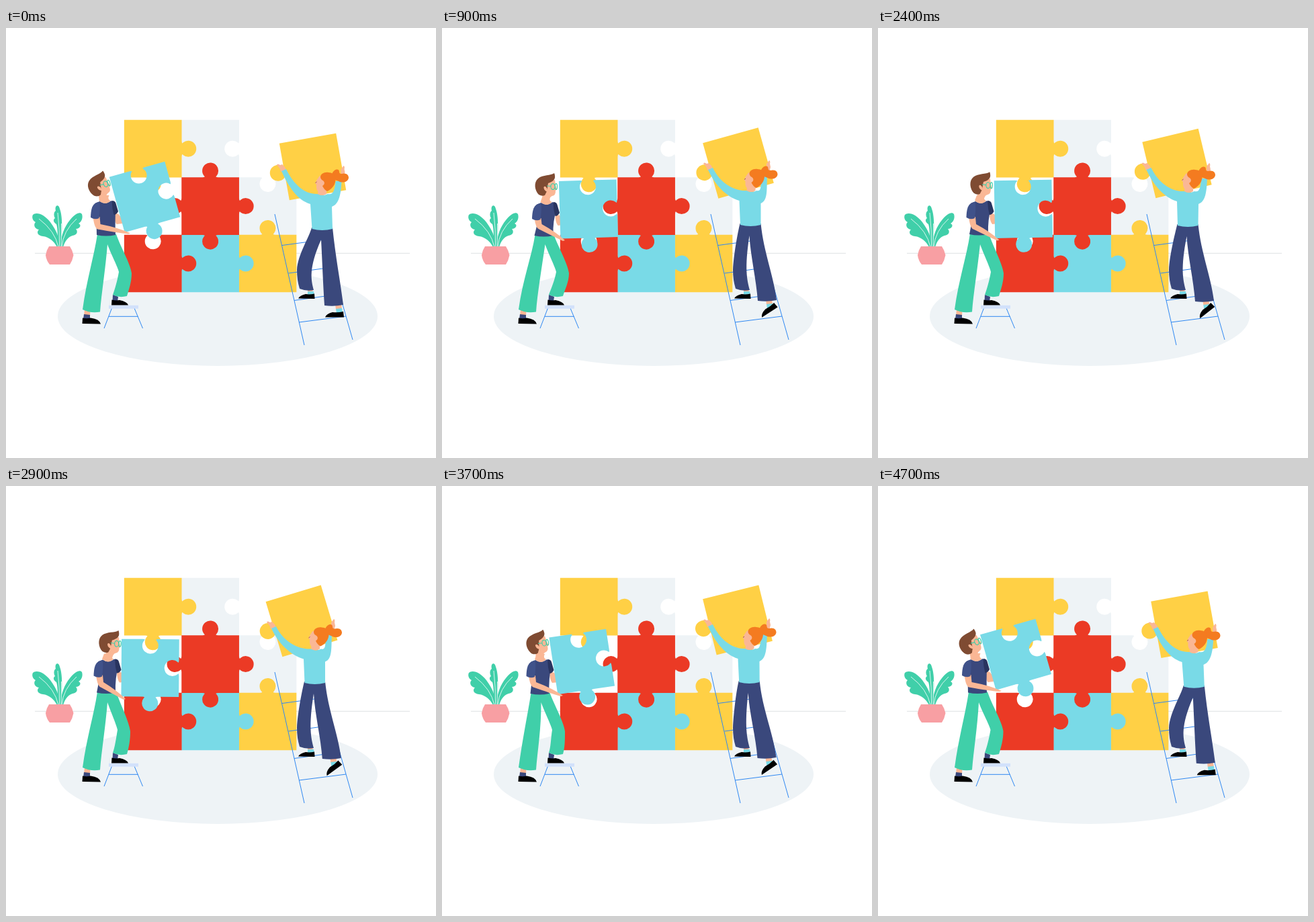
These frames come from a looping animation (640x640 px, 4.8 s). An HTML page with a canvas:

```html
<!DOCTYPE html>
<html lang="en">
<head>
<meta charset="utf-8">
<title>Puzzle team</title>
<style>
html, body { margin: 0; width: 100%; height: 100%; overflow: hidden; background: #fff; }
canvas { display: block; width: 100%; height: 100%; }
</style>
</head>
<body>
<canvas id="stage" width="640" height="640"></canvas>
<script>
const ctx = document.getElementById('stage').getContext('2d');
const LOOP = 4800, STEP = 100, CELL = 85.4;
const yellow = '#ffd045', red = '#eb3a25', aqua = '#79dae7', mist = '#eef3f6',
  green = '#40cfa9', navy = '#3a487c', skin = '#fab795', orange = '#f47b20',
  brown = '#7f4b32', pink = '#f89fa3', line = '#2f88f2';

// Pose tracks, one value per key time
const keys = [0, 900, 1600, 2400, 2900, 3700, 4700];
const manTracks = {
  px: [206.5, 218, 216.6, 216.3, 214.6, 208.2, 205],
  py: [251.5, 269.5, 267.5, 269.3, 270.8, 261.5, 250.7],
  pr: [-15.5, -1.7, -4, -1, .4, -8.7, -16],
  nx: [146.5, 154.5, 153.5, 152, 151, 146, 145.5],
  ny: [259, 261, 261, 259, 259.5, 260, 259],
  headX: [146, 156, 153.5, 154.5, 155, 147, 145],
  headR: [-18, 0, -5, 1, 2, -11, -19],
  hipX: [149, 151.5, 152, 150, 149, 145.5, 148],
  hipY: [309, 310, 311, 308, 308.5, 310, 308.5],
  knee: [187, 189, 189.5, 187, 185, 183, 186.5],
  handX: [185, 183, 183, 180.5, 178, 180, 184],
  handY: [305.5, 316, 315.5, 315.5, 317, 312, 305]
};
const womanTracks = {
  px: [456.5, 441, 443.5, 445, 440, 440, 456],
  py: [206.5, 201, 200, 201.5, 200.8, 199.5, 206.3],
  pr: [-10.1, -15.7, -10.1, -13.5, -16.8, -13.9, -10.2],
  nx: [471, 460.5, 458, 463, 461, 458.5, 470.5],
  ny: [248, 243, 243, 244, 243.5, 243, 248],
  hipX: [470.5, 459, 458, 461, 459.5, 457.2, 470.3],
  hipY: [299, 293, 292.5, 294, 293, 292, 298.8],
  legX: [488, 484, 484, 486, 484.8, 483.5, 487.8],
  legY: [413, 406, 405, 407, 406, 405, 412.8],
  foot: [0, -33, -36, -38, -36, -34, 0],
  leftX: [414, 400, 402, 403.5, 399, 400, 413.7],
  leftY: [211, 209, 205.5, 209, 210, 207, 211],
  rightX: [501.5, 486, 489, 492, 487, 486, 501.2],
  rightY: [211, 203, 205, 207, 204, 203, 211]
};

// Periodic cubic interpolation without overshoot
function sample(v, t) {
  const n = keys.length, time = k => keys[(k + n) % n] + LOOP * Math.floor(k / n);
  const val = k => v[(k + n) % n];
  const slope = k => (val(k + 1) - val(k)) / (time(k + 1) - time(k));
  const tangent = k => {
    const a = slope(k - 1), b = slope(k);
    return a * b > 0 ? 2 * a * b / (a + b) : 0;
  };
  let i = 0;
  while (i < n - 1 && keys[i + 1] <= t) i++;
  const d = time(i + 1) - time(i), u = (t - time(i)) / d, w = 1 - u;
  return (1 + 2 * u) * w * w * val(i) + u * w * w * d * tangent(i)
    + u * u * (3 - 2 * u) * val(i + 1) - u * u * w * d * tangent(i + 1);
}
function pose(tracks, t) {
  const p = {};
  for (const k in tracks) p[k] = sample(tracks[k], t);
  return p;
}

const at = (x, y) => (dx, dy) => `${x + dx} ${y + dy} `;
function fill(color, d) {
  ctx.fillStyle = color;
  ctx.fill(new Path2D(d));
}
function stroke(color, width, d) {
  ctx.strokeStyle = color;
  ctx.lineWidth = width;
  ctx.stroke(new Path2D(d));
}
function placed(x, y, deg, draw) {
  ctx.save();
  ctx.translate(x, y);
  ctx.rotate(deg * Math.PI / 180);
  draw();
  ctx.restore();
}

// sides: top, right, bottom, left; 1 tab, -1 notch, 0 flat
function piece(x, y, deg, color, sides) {
  const h = 42.85, r = 12, off = 9.7, a = Math.asin((off - 2) / r);
  placed(x, y, deg, () => {
    ctx.beginPath();
    ctx.moveTo(-h, -h);
    for (const s of sides) {
      if (s) {
        ctx.lineTo(-11.5, -h);
        ctx.quadraticCurveTo(-6.5, -h - .3 * s, -9.2, -h - 2 * s);
        ctx.arc(0, -h - off * s, r, s * (Math.PI - a), s * a, s < 0);
        ctx.quadraticCurveTo(6.5, -h - .3 * s, 11.5, -h);
      }
      ctx.lineTo(h, -h);
      ctx.rotate(Math.PI / 2);
    }
    ctx.closePath();
    ctx.fillStyle = color;
    ctx.fill();
  });
}
function wallPiece(col, row, color, sides) {
  piece(176 + CELL * (col + .5), 137 + CELL * (row + .5), 0, color, sides);
}

function room() {
  ctx.fillStyle = '#fff';
  ctx.fillRect(0, 0, 640, 640);
  stroke('#dfe2e4', 1, 'M43 335.3H601');
  ctx.fillStyle = mist;
  ctx.beginPath();
  ctx.ellipse(315, 429, 238, 74, 0, 0, 7);
  ctx.fill();
}
function plant() {
  fill(green, 'M79 326C79 310 76 303 66 289C57 277 45 273 40 278C38 282 40 287 44 289C40 293 43 299 49 300C45 304 47 309 55 310C64 311 71 317 76 326Z');
  fill(green, 'M81 326C82 308 87 296 95 286C103 276 110 273 113 277C115 283 112 289 108 291C113 293 110 299 104 299C108 304 105 308 99 309C92 311 88 317 85 326Z');
  fill(green, 'M77 326C77 308 77 298 75 292C70 289 70 285 73 283C70 278 72 273 74 272C72 264 78 261 80 269C84 280 84 297 82 326Z');
  stroke('#fff', .8, 'M49 284Q73 302 78 326M77 275Q80 300 79.6 326M105 284Q85 302 83 326M82.5 291L82 326');
  fill(pink, 'M64 325H95Q99 331 100.5 338Q99 346 95 352H65Q60 346 59 338Q60 331 64 325Z');
}
function wall() {
  wallPiece(1, 0, mist, [0, -1, 0, 0]);
  wallPiece(2, 1, mist, [-1, 0, 0, 0]);
  wallPiece(2, 2, yellow, [1, 0, 0, 0]);
  wallPiece(1, 2, aqua, [0, 1, 0, 0]);
  wallPiece(0, 2, red, [-1, 1, 0, 0]);
  wallPiece(0, 0, yellow, [0, 1, 1, 0]);
  wallPiece(1, 1, red, [1, 1, 1, 1]);
}
function furniture() {
  stroke(line, 1, 'M157.5 417L146 447M191 417L203.5 447M153 429.3H196.5');
  fill('#d2e1fb', 'M153 412.7H197V417.7H153Z');
  stroke(line, 1, 'M400 277L444 472M469 299L516 464M411 323.5L474 315M420.5 365L486 356M429 405.5L497 396M436 438L506 429');
}

function manHead() {
  fill(skin, 'M-1 -28L12 -30L13 -22L15 -16L13 -14Q13.5 -7 8 -6Q4 -5 3 2L-8 2L-5 -14Z');
  fill(brown, 'M11 -40C6 -36 -6 -38 -13 -32C-20 -26 -18 -14 -12 -8Q-7 -5 -3 -7L0 -13L2 -25C8 -27 13 -30 12 -36Q12 -38 11 -40Z');
  fill(skin, 'M1 -15C-1 -22 -5 -21 -4.5 -18Q-4 -14 1 -12Z');
  ctx.strokeStyle = green;
  ctx.lineWidth = 1.2;
  ctx.beginPath();
  ctx.ellipse(9, -20, 3.1, 4.4, 0, 0, 7);
  ctx.moveTo(15.5, -20);
  ctx.ellipse(13.9, -20, 1.6, 4.4, 0, 0, 7);
  ctx.moveTo(0, -21);
  ctx.lineTo(6, -20.5);
  ctx.stroke();
}
function man(p) {
  const n = at(p.nx, p.ny), h = at(p.hipX, p.hipY), hand = at(p.handX, p.handY);
  const k = p.knee, ex = p.nx - 6, ey = 292, elbow = at(ex, ey);
  const mid = at(ex + .6 * (p.handX - ex), ey + .6 * (p.handY - ey));

  fill(skin, `M${n(14, 16)}L${n(21, 18)}Q${n(27, 25)}${n(27, 32)}L${n(18, 33)}Q${n(14, 28)}${n(14, 16)}Z`);
  piece(p.px, p.py, p.pr, aqua, [-1, -1, 1, 0]);

  fill(skin, 'M117 419H125.5L125 428H116Z');
  fill(navy, 'M116 426L125 427V434H115ZM159 397L167 400L166 407H158.5Z');
  fill('#000', 'M114 431.5Q120 433 126 431.5Q139 433 141 440.5L113.5 440ZM157.5 404.5Q164 406 169 405Q180 407 182 412.5L157 412.5Z');
  fill(green, `M${h(-13, -2)}C${p.hipX - 18} 340 120 375 114 419Q126 425 140 422.5C142 395 148 360 ${p.hipX + 2} 322`
    + `C${p.hipX + 7} 336 ${k - 20} 357 ${k - 19} 363C${k - 21} 375 162 389 159 397Q168 402 180 399C183 389 ${k} 378 ${k} 365C${k - 2} 350 ${p.hipX + 22} 327 ${h(15, -2)}Z`);

  fill(navy, `M${n(-7, -1)}Q${n(1, 5)}${n(10, -2)}L${n(17, 4)}Q${h(13, -22)}${h(14, -1)}Q${h(0, 2)}${h(-14, -1)}L${n(-12, 28)}L${n(-14, 2)}Z`);
  fill('#29345f', `M${n(11, -2)}Q${n(16, -2)}${n(17, 2)}L${n(20.5, 14)}Q${n(18, 19)}${n(14, 19)}L${n(12, 10)}Z`);
  fill(skin, `M${n(-8, -2)}L${n(-5, -10)}L${n(7, -10)}Q${n(4, -4)}${n(9, -2)}Q${n(2, 6)}${n(-8, -2)}Z`);
  placed(p.headX, p.ny - 5, p.headR, manHead);

  fill(skin, `M${n(-17, 22)}L${n(-7, 22)}L${elbow(0, 0)}Q${mid(0, -3)}${hand(0, 0)}L${hand(-3, 1)}Q${mid(-1, 5)}${elbow(-4, 7.5)}Q${elbow(-9, 6)}${n(-17, 22)}Z`);
  fill('#40528a', `M${n(-7, 0)}C${n(-17, 1)}${n(-20, 7)}${n(-20.5, 23)}Q${n(-14, 27)}${n(-8, 24)}Q${n(-6, 10)}${n(-7, 0)}Z`);
}

function womanHead() {
  fill(skin, 'M-5 -27Q-8 -23 -11 -17L-9 -15L-9 -10Q-8 -4 -3 -3L6 -4L9 -24L2 -30Z');
  fill(orange, 'M14 -30C16 -38 25 -40 25 -34Q25 -31 28 -31C36 -33 39 -29 39 -25C38 -18 29 -17 24 -20Q18 -22 14 -25Z');
  fill(orange, 'M-3 -26C-3 -31 3 -34 9 -33C14 -33 19 -30 19.5 -24C20 -15 14 -8 7 -5Q2 -8 0 -13C4 -15 4 -20 -1 -22Q-3 -24 -3 -26Z');
  stroke('#a04f2a', .9, 'M-10.5 -17.5L-8.5 -19');
}
function woman(p) {
  const n = at(p.nx, p.ny), h = at(p.hipX, p.hipY), leg = at(p.legX, p.legY);
  const l = at(p.leftX, p.leftY), r = at(p.rightX, p.rightY);
  piece(p.px, p.py, p.pr, yellow, [0, 0, 1, 1]);

  const shift = 6 + p.foot * 8 / 33, a = at(p.legX + shift / 2, p.legY);
  fill(skin, `M449 387L456 388L457 394H449ZM${a(-1, -2)}L${a(8, -2)}L${a(9, 6)}L${a(0, 6)}Z`);
  fill(aqua, `M449 392H458L459 397H449ZM${a(0, 5)}L${a(9, 4)}L${a(10, 11)}L${a(1, 12)}Z`);
  fill('#000', 'M435 402.5Q437 398 446 396Q452 397 459 395.5L459.5 403Z');
  placed(p.legX + shift, p.legY - 1, p.foot, () =>
    fill('#000', 'M-19 18.5Q-17 13 -8 11Q0 12 8 10L9 18.5Z'));

  fill(navy, `M${h(-15.5, -2)}C${h(-19, 12)}434 338 433 360Q433 375 437 388Q447 392 458 390C454 375 450 358 ${h(-1.5, 16)}`
    + `C${h(0, 45)}${leg(-16, -30)}${leg(-14, 0)}Q${leg(0, 2)}${leg(14, -1)}C${leg(9, -40)}${h(20, 42)}${h(15.5, -2)}Z`);

  fill(skin, `M${l(-5, 3)}Q${l(-6, -3)}${l(-11, -7)}Q${l(-10, -10)}${l(-6, -7)}L${l(-3, -8)}Q${l(1, -5)}${l(3, 0)}Z`);
  fill(skin, `M${r(-9, 19)}L${r(-3, 6)}L${r(-3, -1)}L${r(1, -6)}Q${r(3, -5)}${r(2, -1)}L${r(3, 4)}L${r(-1, 19)}Z`);
  fill(aqua, `M${l(-4, 2)}C${l(6, 24)}${n(-38, 8)}${n(-18, 14)}L${h(-15, 0)}Q${h(0, 4)}${h(15.5, 0)}L${n(14, 18)}`
    + `C${n(25, 14)}${r(-3, 36)}${r(-2, 17)}L${r(-11, 17)}C${r(-12, 30)}${n(16, 1)}${n(8, -1)}`
    + `Q${n(0, 3)}${n(-7, -1)}C${n(-26, 0)}${l(14, 22)}${l(3, -1)}Z`);
  fill(skin, `M${n(-7, -1)}L${n(-6, -9)}L${n(6, -10)}L${n(6, -1)}Q${n(0, 3)}${n(-7, -1)}Z`);
  placed(p.nx, p.ny, 0, womanHead);
}

function draw(now) {
  const t = Math.floor(now % LOOP / STEP) * STEP;
  room();
  plant();
  wall();
  furniture();
  man(pose(manTracks, t));
  woman(pose(womanTracks, t));
}
function tick() {
  draw(performance.now());
  requestAnimationFrame(tick);
}
tick();
</script>
</body>
</html>
```
